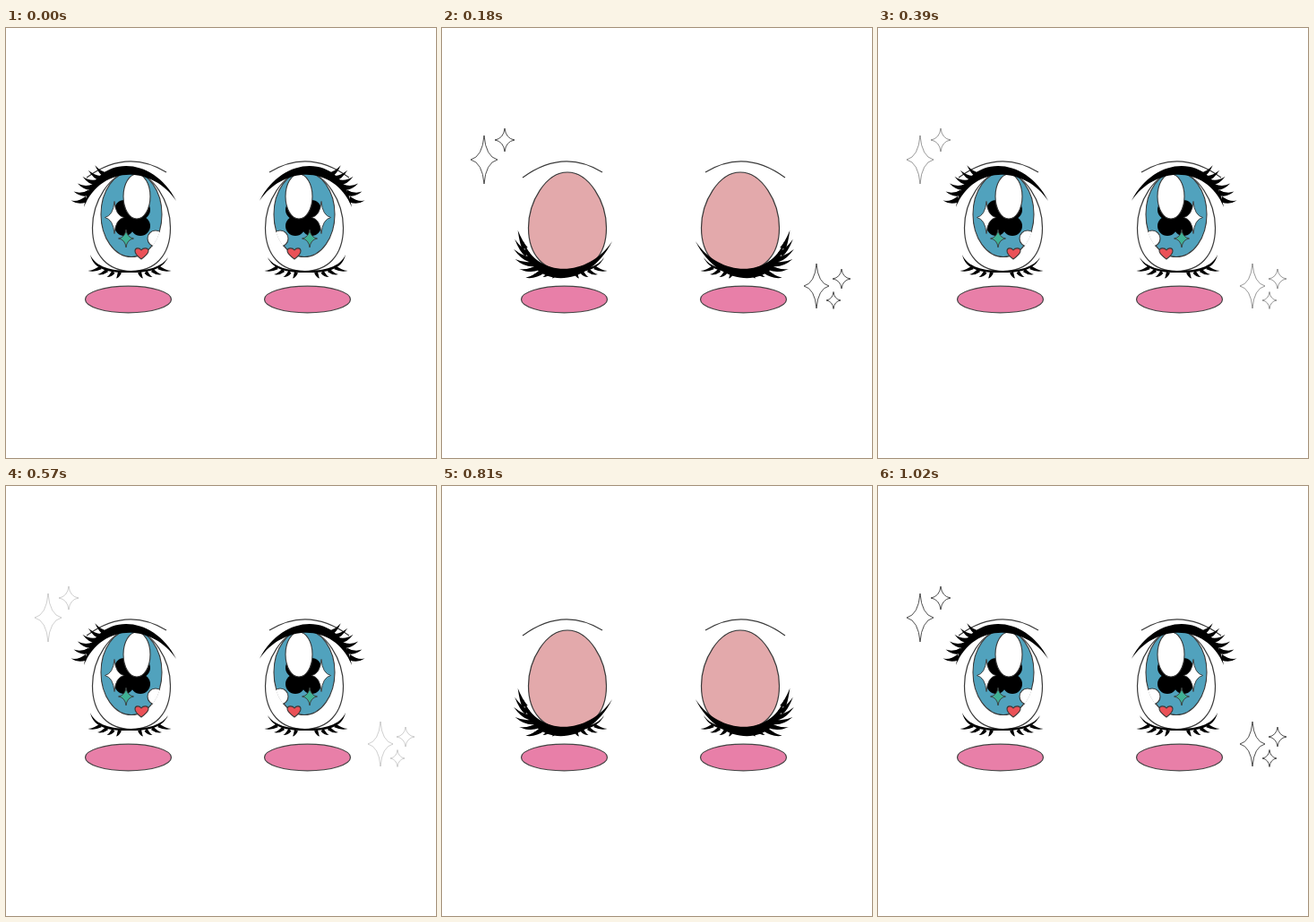
Write an HTML page with a canvas that moves like this. It is 480 by 480 pixels and loops after 1320 ms.

```html
<!DOCTYPE html>
<html>
<head>
<meta charset="utf-8">
<style>
  html, body { margin: 0; width: 100%; height: 100%; overflow: hidden; background: #fff; }
  canvas { display: block; }
</style>
</head>
<body>
<canvas id="stage" width="480" height="480"></canvas>
<script>
const c = document.getElementById('stage').getContext('2d');
c.lineJoin = 'round';
const INK = '#3a3a3a', BLACK = '#000', WHITE = '#fff';
const STEP = 30, LOOP = 1320, BLINK = 540, REST = 480;

const EGG = new Path2D('M140 161C164 161 183.5 194 183.5 223C183.5 255 165 271.5 140 271.5' +
  'C115 271.5 96.5 255 96.5 223C96.5 194 116 161 140 161Z');
const CREASE = new Path2D('M90 167Q135 134 179 161');
const LOWER_BAND = new Path2D('M94 253C100 267 118 271 138 271C158 271 174 267 181 256' +
  'C174 271 157 273 138 273C116 273 98 271 94 253Z');
const HEART = new Path2D('M151 258C147 255 144 252 144 249C144 245 149 245 151 248' +
  'C153 245 159 245 159 249C159 252 155 255 151 258Z');

const mix = (a, b, k) => a + (b - a) * k;
const ramp = (t, a, b) => Math.max(0, Math.min(1, (t - a) / (b - a)));
const bezier = (a, b, d, e, t) => {
  const s = 1 - t;
  return s * s * s * a + 3 * s * s * t * b + 3 * s * t * t * d + t * t * t * e;
};

function paint(path, fill, line, width = 1.1) {
  if (fill) { c.fillStyle = fill; c.fill(path); }
  if (line) { c.strokeStyle = line; c.lineWidth = width; c.stroke(path); }
}

function oval(x, y, rx, ry = rx) {
  const p = new Path2D();
  p.ellipse(x, y, rx, ry, 0, 0, 7);
  return p;
}

// Four-pointed star with hollow sides
function star(x, y, rx, ry, fill = WHITE) {
  const p = new Path2D(), k = .12;
  p.moveTo(x, y - ry);
  for (const [px, py, cx, cy] of [[1, 0, 1, -1], [0, 1, 1, 1], [-1, 0, -1, 1], [0, -1, -1, -1]])
    p.quadraticCurveTo(x + cx * rx * k, y + cy * ry * k, x + px * rx, y + py * ry);
  p.closePath();
  paint(p, fill, INK, .9);
}

// Tapered hair that curls up towards its tip
function hair(x, y, dx, dy, w, sag) {
  const k = w / 2 / Math.hypot(dx, dy), nx = dy * k, ny = -dx * k;
  const mx = x + dx / 2, my = y + dy / 2 + sag;
  const p = new Path2D();
  p.moveTo(x + nx, y + ny);
  p.quadraticCurveTo(mx + nx * .6, my + ny * .6, x + dx, y + dy);
  p.quadraticCurveTo(mx - nx * .6, my - ny * .6, x - nx, y - ny);
  p.closePath();
  paint(p, BLACK);
}

function drawIris() {
  c.save();
  c.clip(EGG);
  paint(oval(140, 208, 34, 47.5), '#51a2bd', INK);
  paint(oval(141, 212, 14), BLACK);
  for (const sx of [-9, 9])
    for (const sy of [-9, 9]) paint(oval(141 + sx, 212 + sy, 11), BLACK);
  paint(oval(146, 188, 15, 25), WHITE, INK);
  star(121, 211.5, 10.5, 18);
  star(134, 235, 8.5, 10, '#3fb195');
  c.clip(oval(140, 208, 34.8, 48.3));
  paint(oval(167, 235, 9), WHITE, INK);
  c.restore();
  paint(HEART, '#ea5157', INK);
}

// The upper lash turns from an arch into a bowl, then drops the rest of the way
function lashPose(bend, drop) {
  const y = (open, shut) => mix(open, shut, bend) - 19 * bend * (1 - drop);
  return {
    bend,
    outerX: mix(87, 91, bend), outerY: y(200, 238), innerY: y(193, 238),
    top: y(140, 279), low: y(153, 293)
  };
}

function drawLid({ outerX, outerY, innerY, top, low }) {
  const y = (top + low) / 2, above = new Path2D();
  above.moveTo(outerX, outerY);
  above.bezierCurveTo(97, y, 163, y, 190, innerY);
  above.lineTo(230, 0);
  above.lineTo(40, 0);
  c.save();
  c.clip(above);
  paint(EGG, '#e3a9ab');
  c.restore();
}

function drawUpperLash({ bend, outerX, outerY, innerY, top, low }) {
  const band = new Path2D();
  band.moveTo(outerX, outerY);
  band.bezierCurveTo(97 + 9 * bend, top, 163, top, 190, innerY);
  band.bezierCurveTo(163, low, 106 - 9 * bend, low, outerX, outerY);
  paint(band, BLACK);
  const y = (top + low) / 2, count = 6;
  for (let i = 0; i < count; i++) {
    const t = .06 + i * .055, k = i / (count - 1);
    const angle = Math.PI * mix(mix(.97, 1.22, k), mix(1.38, .87, k), bend);
    const len = mix(17, 22, bend);
    hair(bezier(outerX, 97, 163, 190, t), bezier(outerY, y, y, innerY, t),
      len * Math.cos(angle), len * Math.sin(angle), 6.5, 4.5);
  }
}

function drawLowerLash() {
  paint(LOWER_BAND, BLACK);
  for (const side of [-1, 1])
    for (let i = 0; i < 4; i++)
      hair(138 + side * (11 + 7 * i), 272.5 - .6 * i * i, side * (4 + 3.5 * i), 7 - i, 4.5, 2.5);
}

function drawEye(bend, drop) {
  const pose = lashPose(bend, drop);
  paint(oval(136.5, 303, 48, 14.8), '#e87fa8', '#444', 1.2);
  paint(CREASE, null, INK);
  paint(EGG, WHITE);
  drawIris();
  if (bend > 0) drawLid(pose);
  paint(EGG, null, INK, 1.2);
  drawLowerLash();
  drawUpperLash(pose);
}

function drawSparkles() {
  star(47, 147, 15, 27);
  star(70, 125, 11, 13);
  star(418, 288, 14, 25);
  star(446, 280, 10, 11);
  star(437, 304, 8, 9.5);
}

function draw(time) {
  const now = Math.floor(time % LOOP / STEP) * STEP;
  const t = Math.min(now < BLINK + STEP ? now : now - BLINK, REST);
  const bend = ramp(t, 30, 150) - ramp(t, 300, 390);
  const drop = ramp(t, 150, 180) - ramp(t, 270, 300);
  c.clearRect(0, 0, 480, 480);
  drawEye(bend, drop);
  c.save();
  c.translate(473, 0);
  c.scale(-1, 1);
  drawEye(bend, drop);
  c.restore();
  c.globalAlpha = ramp(t, 0, 110) - ramp(t, 180, 270) + ramp(t, 270, 480);
  drawSparkles();
  c.globalAlpha = 1;
}

const start = performance.now();
function tick() {
  draw(performance.now() - start);
  requestAnimationFrame(tick);
}
tick();
</script>
</body>
</html>
```
